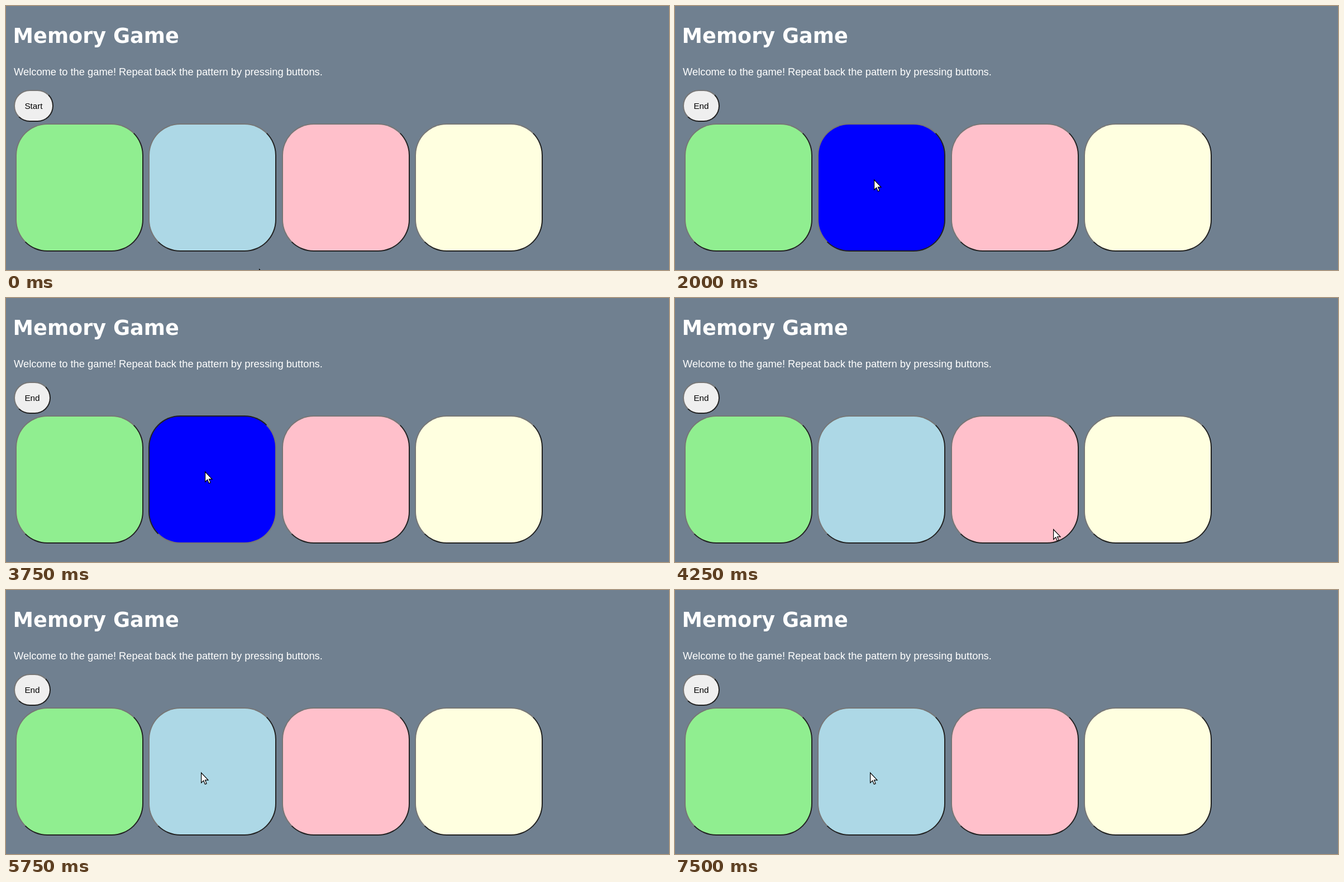
An HTML page for the animation above (8 s loop, 1187 by 472 pixels).

```html
<!DOCTYPE html>
<html lang="en">
<head>
<meta charset="utf-8">
<title>Memory Game</title>
<style>
  html, body { margin: 0; width: 100%; height: 100%; overflow: hidden; background: #708090; }
  #stage { position: relative; width: 1187px; height: 472px; overflow: hidden; }
  #stage > * { position: absolute; box-sizing: border-box; margin: 0; white-space: nowrap; }
  h1 { left: 12.6px; top: 32px; font: bold 36.65px/43px "DejaVu Sans", sans-serif; color: #fff; }
  p { left: 14px; top: 107px; font: 18.33px/22px "Liberation Sans", Arial, sans-serif; color: #fff; }
  .key { border: 2px solid; border-color: #767676 #222 #222 #767676; }
  .key.down { border-color: #222 #767676 #767676 #222; }
  #toggle {
    left: 14px; top: 150px; height: 57px; border-radius: 28.5px; background: #efefef;
    font: 15.27px/53px "Liberation Sans", Arial, sans-serif; color: #000; text-align: center;
  }
  .tile { top: 210px; width: 229px; height: 229px; border-radius: 57px; }
  #cursor { left: 0; top: 0; overflow: visible; }
</style>
</head>
<body>
<div id="stage">
  <h1>Memory Game</h1>
  <p>Welcome to the game! Repeat back the pattern by pressing buttons.</p>
  <div id="toggle" class="key"></div>
  <svg id="cursor" width="14" height="23">
    <path d="M.6 .8V18.6L4.7 14.7L7.4 21.2L10.1 20.1L7.5 13.8H13Z"
      fill="#fff" stroke="#000" stroke-width="1.2"/>
  </svg>
</div>
<script>
const LOOP = 8000, STEP = 250;
const stage = document.getElementById('stage');
const toggle = document.getElementById('toggle');
const cursor = document.getElementById('cursor');

const tiles = ['#90ee90', '#add8e6', '#ffc0cb', '#ffffe0'].map((color, i) => {
  const tile = document.createElement('div');
  tile.className = 'key tile';
  tile.style.left = Math.round(16.5 + i * 238.6) + 'px';
  tile.style.background = color;
  stage.insertBefore(tile, cursor);
  return tile;
});
const blue = tiles[1];

// Pointer stops: [start ms, x, y]; no position means hidden
const stops = [
  [0, 453, 470], [250, 160, 253], [500, 61, 166], [750, 46, 167],
  [1250, 222, 253], [1500, 356, 310], [4000, 402, 316], [4250, 677, 413],
  [4500, 820, 408], [4750], [5000, 801, 443], [5250, 449, 355], [5500, 349, 326]
];
const flashes = [[2000, 3000], [4750, 5750], [6250, 7250]];
const press = [3750, 4000];
const within = (t, [from, to]) => t >= from && t < to;

function draw(t) {
  const started = t >= 1000;
  toggle.textContent = started ? 'End' : 'Start';
  toggle.style.width = started ? '66px' : '71px';

  const down = within(t, press);
  blue.classList.toggle('down', down);
  blue.style.background = down || flashes.some(f => within(t, f)) ? '#00f' : '#add8e6';

  const [, x, y] = stops.filter(s => s[0] <= t).pop();
  cursor.style.display = x === undefined ? 'none' : 'block';
  if (x !== undefined) cursor.style.transform = `translate(${x}px, ${y}px)`;
}

const origin = performance.now();
function tick() {
  const t = (performance.now() - origin) % LOOP;
  draw(Math.floor(t / STEP) * STEP);
  requestAnimationFrame(tick);
}
tick();
</script>
</body>
</html>
```
